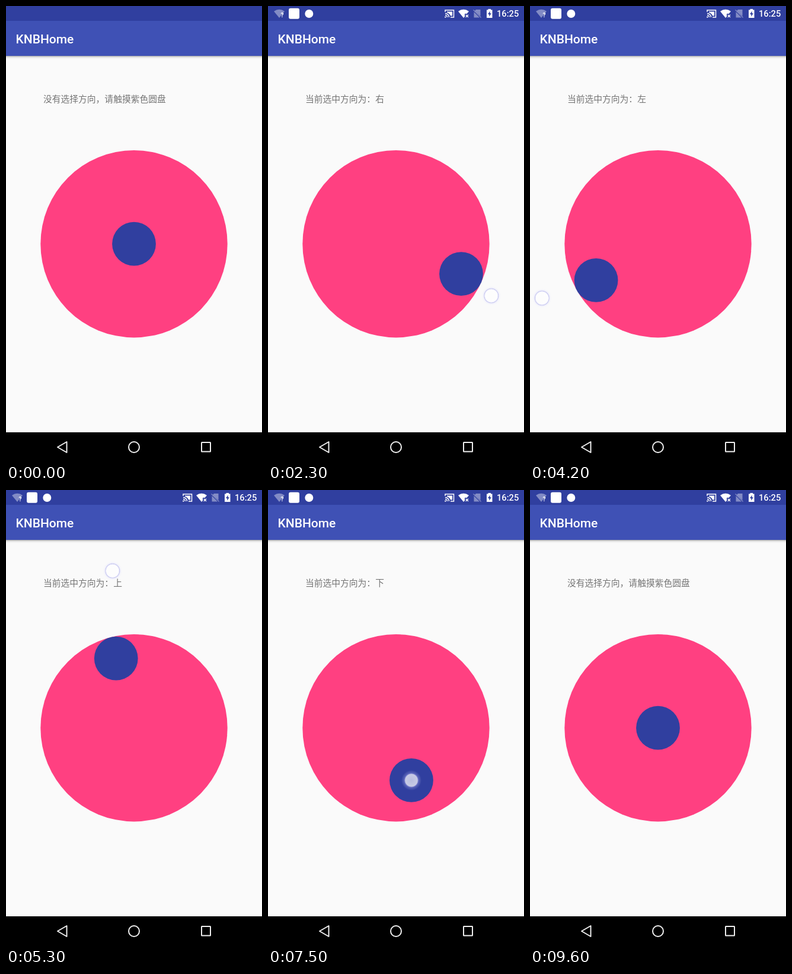
An HTML page for the animation above (9700 ms loop, 432x768 px).

```html
<!DOCTYPE html>
<html lang="zh-CN">
<head>
<meta charset="utf-8">
<title>Direction pad</title>
<style>
  html, body { margin: 0; width: 100%; height: 100%; overflow: hidden; background: #fafafa; }
  svg { display: block; width: 432px; height: 768px; }
  text { font-family: Roboto, "Noto Sans CJK SC", "Noto Sans CJK", sans-serif; }
  .title { font-size: 21px; font-weight: 500; fill: #fff; }
  .clock { font-size: 14.7px; font-weight: 500; fill: #fff; }
  #label { font-size: 14.78px; fill: #757575; font-family: "Noto Sans CJK SC", "Noto Sans CJK", sans-serif; }
</style>
</head>
<body>
<svg viewBox="0 0 432 768">
  <defs>
    <linearGradient id="shadow" x2="0" y2="1">
      <stop stop-color="#000" stop-opacity=".34"/>
      <stop offset=".4" stop-color="#000" stop-opacity=".1"/>
      <stop offset="1" stop-color="#000" stop-opacity="0"/>
    </linearGradient>
    <radialGradient id="glow">
      <stop stop-color="#fff" stop-opacity=".66"/>
      <stop offset=".6" stop-color="#fff" stop-opacity=".73"/>
      <stop offset=".66" stop-color="#dcdcff" stop-opacity=".5"/>
      <stop offset=".7" stop-color="#8c8cdc" stop-opacity=".5"/>
      <stop offset=".77" stop-color="#c8c8ff" stop-opacity=".2"/>
      <stop offset="1" stop-color="#fff" stop-opacity="0"/>
    </radialGradient>
  </defs>

  <rect width="432" height="768" fill="#fafafa"/>
  <rect y="84" width="432" height="5" fill="url(#shadow)"/>
  <rect width="432" height="84" fill="#3f51b5"/>
  <rect width="432" height="25" fill="#303f9f"/>
  <text class="title" x="16.5" y="63">KNBHome</text>

  <g id="status" fill="#fff">
    <path d="M10 9Q19 2.5 28 9L19 20Z" opacity=".4"/>
    <text x="21.5" y="19" font-size="10" font-weight="700">?</text>
    <rect x="35" y="3.7" width="18" height="18" rx="3"/>
    <circle cx="69.3" cy="13" r="7"/>
    <path d="M299 10V7H313.5V19H308M299 12.5A6.5 6.5 0 0 1 305.5 19M299 15.5A3.5 3.5 0 0 1 302.5 19"
      fill="none" stroke="#fff" stroke-width="1.5"/>
    <path d="M302 9.5H311V16.5H308Q306.5 12 302 11Z"/>
    <circle cx="299.3" cy="18.6" r="1.2"/>
    <path d="M321 9Q330 2.5 339 9L335.5 13H332V18L330 20Z"/>
    <path d="M333.7 14.7L338 19M338 14.7L333.7 19" stroke="#fff" stroke-width="1.4"/>
    <g opacity=".4">
      <path d="M351 6H358.5V17L348.5 8.5ZM347.5 10L357 19.5H347.5Z"/>
      <path d="M346.5 6.5L359.5 19.5" stroke="#fff" stroke-width="1.3"/>
    </g>
    <path d="M369 6.5H371.5V5H376V6.5H378.5V20H369Z"/>
    <path d="M374.6 8.5L371 14H373.3V18L376.8 12.3H374.6Z" fill="#303f9f"/>
    <text class="clock" x="386" y="18">16:25</text>
  </g>

  <text id="label" x="63" y="162"></text>
  <circle cx="216" cy="400.7" r="157.7" fill="#ff4081"/>
  <circle id="knob" r="36.9" fill="#303f9f"/>
  <circle id="touch" r="17" fill="url(#glow)"/>

  <rect y="718" width="432" height="50"/>
  <g fill="none" stroke="#eee" stroke-width="2">
    <path d="M87 743L102.5 734V752Z" stroke-linejoin="round"/>
    <circle cx="216" cy="743" r="9"/>
    <rect x="330" y="735" width="15" height="15.5" rx=".5"/>
  </g>
</svg>
<script>
const LOOP = 9700, STEP = 100, LAG = 70;
const CENTER = { x: 216, y: 400.7 }, REACH = 121;
const BOOT = 100, PRESS = 300, RELEASE = 9400;

// Key points of the finger's sweep around the pad: time, degrees, distance.
const keys = [
  [1100, -11, 18], [1200, -20.6, 21.4], [2300, 28.5, 183], [4200, 155, 216],
  [4500, 182, 199], [5300, 262.2, 267], [6100, 333, 197], [6600, 380, 182],
  [6800, 380, 182], [7050, 420, 226], [7200, 433.6, 92], [7800, 433.6, 92],
  [9100, 436, 14]
];

const get = id => document.getElementById(id);
const [status, label, knob, touch] = ["status", "label", "knob", "touch"].map(get);

const rate = (i, column) =>
  (keys[i + 1][column] - keys[i][column]) / (keys[i + 1][0] - keys[i][0]);

// Harmonic mean of neighbouring rates: smooth passes, flat at turns and rests.
function slope(i, column) {
  if (i === 0 || i === keys.length - 1) return 0;
  const before = rate(i - 1, column), after = rate(i, column);
  return before * after > 0 ? 2 * before * after / (before + after) : 0;
}

function curve(time, column) {
  const t = Math.min(Math.max(time, keys[0][0]), keys.at(-1)[0]);
  const i = Math.max(1, keys.findIndex(key => key[0] >= t)) - 1;
  const span = keys[i + 1][0] - keys[i][0];
  const k = (t - keys[i][0]) / span, rest = 1 - k;
  const ease = k * k * (3 - 2 * k);
  return keys[i][column] * (1 - ease) + keys[i + 1][column] * ease +
    span * k * rest * (rest * slope(i, column) - k * slope(i + 1, column));
}

const fingerAt = time => ({ angle: curve(time, 1), radius: curve(time, 2) });

function place(circle, { angle, radius }) {
  const a = angle * Math.PI / 180;
  circle.setAttribute("cx", CENTER.x + radius * Math.cos(a));
  circle.setAttribute("cy", CENTER.y + radius * Math.sin(a));
}

function show(element, visible) {
  element.style.display = visible ? "" : "none";
}

function draw(now) {
  const t = Math.floor(now % LOOP / STEP) * STEP;
  const pressed = t >= PRESS && t < RELEASE;
  show(status, t >= BOOT);
  show(touch, pressed);
  if (pressed) {
    const { angle, radius } = fingerAt(t - LAG);
    place(touch, fingerAt(t));
    place(knob, { angle, radius: Math.min(radius, REACH) });
    label.textContent = "当前选中方向为：" + "右下左上"[Math.floor((angle + 405) / 90) % 4];
  } else {
    place(knob, { angle: 0, radius: 0 });
    label.textContent = "没有选择方向，请触摸紫色圆盘";
  }
}

function tick() {
  draw(performance.now());
  requestAnimationFrame(tick);
}
tick();
</script>
</body>
</html>
```
